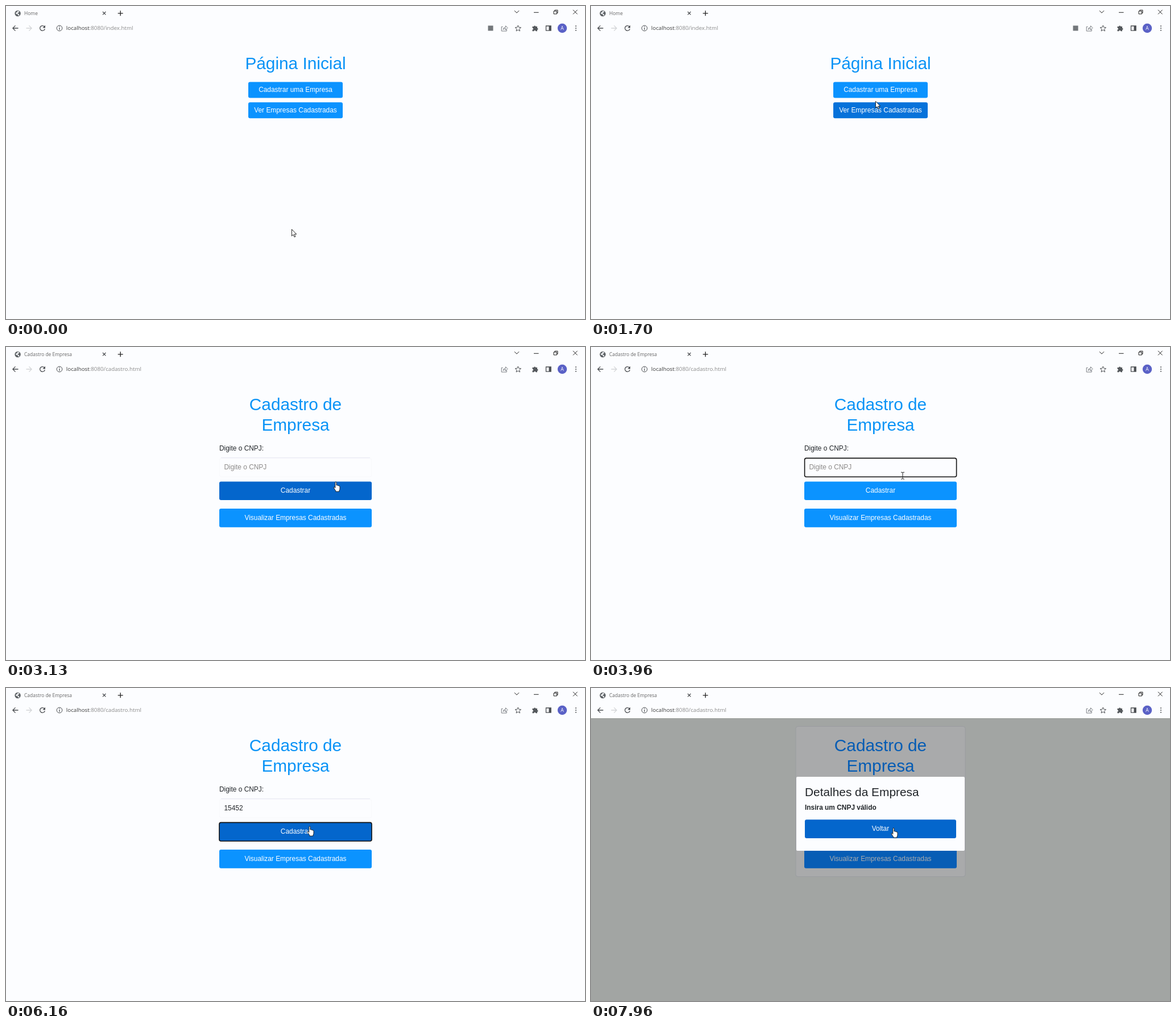
Animation of 1018x550 px, one loop 8000 ms. Source, as an HTML page:

```html
<!DOCTYPE html>
<html lang="pt">
<head>
<meta charset="utf-8">
<title>Cadastro</title>
<style>
html, body { margin: 0; width: 100%; height: 100%; overflow: hidden; background: #fcfdff; }
svg { display: block; width: 1018px; height: 550px; }
text { font: 11.92px "Liberation Sans", Arial, sans-serif; fill: #212529; }
.h1 { font-size: 29.8px; fill: #0a93f6; text-anchor: middle; }
.h2 { font-size: 20.86px; }
.bold { font-weight: 700; }
.btn { fill: #fff; text-anchor: middle; }
.hint { fill: #8c8a88; }
.tab { font: 8.45px "Open Sans", "Noto Sans", sans-serif; fill: #666; }
.url { font: 9.76px "Open Sans", "Noto Sans", sans-serif; fill: #8b8b8b; }
.host { fill: #3c3c3c; }
.line { fill: none; stroke: #4a4d51; stroke-width: 1.3; }
.thin { fill: none; stroke: #222; stroke-width: 1; }
.pointer { fill: #fff; stroke: #111; stroke-width: .9; stroke-linejoin: round; }
</style>
</head>
<body>
<svg viewBox="0 0 1018 550">
  <rect width="1018" height="550" fill="#fcfdff"/>

  <g id="homePage">
    <text class="h1" x="509" y="111">Página Inicial</text>
    <rect id="focusRing" x="424.5" y="132" width="169" height="31" rx="4" fill="#a9defb"/>
    <rect id="register" x="426" y="133.5" width="166" height="28" rx="3"/>
    <text class="btn" x="509" y="151">Cadastrar uma Empresa</text>
    <rect id="list" x="426" y="169.3" width="166" height="28" rx="3"/>
    <text class="btn" x="509" y="187">Ver Empresas Cadastradas</text>
  </g>

  <g id="formPage">
    <g id="dim">
      <rect y="53" width="1018" height="497" fill="#a2a5a3"/>
      <rect x="360" y="67.5" width="298" height="264" rx="4" fill="#a9aaab" stroke="#9a9ca0"/>
    </g>
    <text class="h1 tinted" x="509" y="111">Cadastro de</text>
    <text class="h1 tinted" x="509" y="147">Empresa</text>
    <text x="375" y="182">Digite o CNPJ:</text>
    <rect id="field" x="375.6" y="195.4" width="267" height="32.8" rx="3" fill="#fcfdff"/>
    <path id="fieldTop" d="M378 194.7H640" stroke="#e6e8f1"/>
    <text id="entry" x="383.5" y="215.3"></text>
    <rect id="caret" y="205" width="1" height="13" fill="#111"/>
    <rect id="submit" x="375" y="236.4" width="268" height="32.6" rx="3"/>
    <text class="btn" x="509" y="256.3">Cadastrar</text>
    <rect id="view" x="375" y="284" width="268" height="32.8" rx="3"/>
    <text id="viewLabel" class="btn" x="509" y="304">Visualizar Empresas Cadastradas</text>
    <g id="modal">
      <rect x="361" y="156" width="296" height="130" rx="2" fill="#fcfdff"/>
      <text class="h2" x="376" y="190">Detalhes da Empresa</text>
      <text class="bold" x="376" y="213.8">Insira um CNPJ válido</text>
      <rect id="back" x="376" y="231.3" width="266" height="32.6" rx="3"/>
      <text class="btn" x="509" y="251">Voltar</text>
    </g>
  </g>

  <g id="browser">
    <g id="globe">
      <circle cx="20.6" cy="13" r="5.2" fill="#5c6064"/>
      <path d="M17 11.5q2 .2 2.6-1.5t2.3-1.2l1.6 1.2-1.5 1.6-2 1.3 2.6 1 1 2-1.6 1.3-1.6-2.6-2.7-.5z" fill="#eef0f2"/>
    </g>
    <path id="spinner" d="M15.6 11.6A5.2 5.2 0 1 0 25.8 11.6" fill="none" stroke="#4a90df" stroke-width="1.3"/>
    <text id="tabTitle" class="tab" x="32" y="16"></text>
    <path class="line" d="M170 10l5.4 5.4m0-5.4l-5.4 5.4"/>
    <path class="line" style="stroke:#222" d="M196.7 12.8h9m-4.5-4.5v9"/>
    <path class="thin" d="M894 8.2l4 4 4-4M928 11.3h8.5M963 9h5.4v5h-5.4zM964.8 9V7.2h5.2v5h-1.6M997 6.8l7.6 7.6m0-7.6l-7.6 7.6"/>
    <path class="line" d="M21.5 39h-9.6m4.6-4.6L11.900 39l4.600 4.600"/>
    <path class="line" style="stroke:#d3d5d8" d="M35.500 39h9.600m-4.600-4.600L45.100 39l-4.600 4.600"/>
    <g id="reload">
      <path class="line" d="M67.400 36.100A4.400 4.400 0 1 0 68.300 40.200"/>
      <path d="M69 33.800v4.600h-4.600z" fill="#4a4d51"/>
    </g>
    <path id="stop" class="line" d="M60 35l8 8m0-8l-8 8"/>
    <circle class="line" style="stroke-width:1" cx="94" cy="39" r="4.800"/>
    <path class="line" d="M94 38.300v3.400M94 35.800v1.300"/>
    <text class="url" x="105.800" y="42.300"><tspan class="host">localhost</tspan><tspan id="path"></tspan></text>

    <rect id="translate" x="847.500" y="34.500" width="9" height="9" fill="#73777b"/>
    <path class="thin" style="stroke:#777b80" d="M873.500 36.500h-2.300v7.500h9v-2.800M874 41.300q.3-3.800 4.500-4v-2.500l3.500 3.700-3.500 3.600v-2.400q-3-.1-4.500 1.600z"/>
    <path class="thin" style="stroke:#4a4d51" d="M900.300 34l1.500 3.500 3.700.3-2.800 2.500.8 3.700-3.200-2-3.200 2 .8-3.700-2.800-2.500 3.700-.3z"/>
    <path fill="#55595d" d="M925.500 36h2.700a1.500 1.500 0 0 1 3 0h2.800v2.800a1.500 1.500 0 0 1 0 3v2.400h-2.700a1.500 1.500 0 0 0-3 0h-2.800v-2.700a1.500 1.500 0 0 0 0-3z"/>
    <path class="line" d="M949.500 35h8.600v8.200h-8.600z"/>
    <path fill="#4a4d51" d="M954.500 35h3.600v8h-3.600z"/>
    <circle cx="978" cy="39" r="8.200" fill="#5a61c6"/>
    <text class="tab" style="fill:#fff" x="978" y="42" text-anchor="middle">A</text>
    <g fill="#4a4d51"><circle cx="1002" cy="35.300" r="1"/><circle cx="1002" cy="39" r="1"/><circle cx="1002" cy="42.700" r="1"/></g>
  </g>

  <g id="mouse">
    <path id="arrow" class="pointer" d="M.4.400V12.200l2.700-2.500 1.900 4.300 1.900-.8-1.900-4.200h3.700z"/>
    <path id="hand" class="pointer" d="M-1.200 10.500V1.200q0-1.200 1.100-1.200T1 1.200V6q1.500-1 2.100.5 1.500-.7 2 .6 1.900-.4 1.900 1.300v3.700q0 1.800-1.100 3.200v1.700h-6.200v-1.400q-2-2.300-3.400-5.400-.2-1.500 1.100-1.200z"/>
    <path id="beam" class="thin" d="M-3-5.800h2.200L0-5 .800-5.800H3M0-5V5.200M-3 6h2.200L0 5.200.800 6H3"/>
  </g>
</svg>
<script>
const LOOP = 8000;
const LOAD = 2230, FORM = 2600, FOCUS = 3430, CLICK = 6060, MODAL = 6900;
const BASE = [11, 147, 255], HOVER = [4, 102, 204], DIMMED = [7, 93, 181];
const KEY_TIMES = [4330, 4500, 4660, 4800, 5000];
const DIGIT_WIDTH = 6.63;

// Pointer stops: time, x, y
const STOPS = [
  [200, 502, 392], [1200, 503, 190], [1560, 500, 184], [1700, 500, 167],
  [1850, 504, 150], [2360, 504, 150], [2530, 634, 282], [2700, 634, 282],
  [3130, 580, 237], [3450, 548, 226], [5730, 548, 226], [6100, 534, 243],
  [7595, 534, 243], [7630, 532, 246]
];
const HAND_TIMES = [[1160, 1665], [1760, 2390], [2850, 3150], [5937, LOOP]];

const ui = {};
document.querySelectorAll('[id]').forEach(el => ui[el.id] = el);
const tinted = document.querySelectorAll('.tinted');

const clamp = v => Math.max(0, Math.min(1, v));
const smooth = v => v * v * (3 - 2 * v);
const within = (t, from, to) => t >= from && t < to;
const show = (el, on) => el.style.display = on ? '' : 'none';
const setText = (el, text) => { if (el.textContent !== text) el.textContent = text; };
const paint = (el, rgb) => el.setAttribute('fill', `rgb(${rgb.map(Math.round)})`);

// Hover level with a 150 ms transition in and out
const hover = (t, from, to) => smooth(clamp((t - from) / 150)) * (1 - smooth(clamp((t - to) / 150)));
const shade = (el, level) => paint(el, BASE.map((c, i) => c + (HOVER[i] - c) * level));

function pointerAt(t) {
  const next = STOPS.findIndex(s => s[0] > t);
  if (next === 0) return STOPS[0].slice(1);
  if (next < 0) return STOPS[STOPS.length - 1].slice(1);
  const [t0, x0, y0] = STOPS[next - 1], [t1, x1, y1] = STOPS[next];
  const k = smooth((t - t0) / (t1 - t0));
  return [x0 + (x1 - x0) * k, y0 + (y1 - y0) * k];
}

function drawBrowser(t) {
  const loading = within(t, LOAD, FORM), left = t >= LOAD;
  show(ui.globe, !loading);
  show(ui.spinner, loading);
  show(ui.reload, !loading);
  show(ui.stop, loading);
  show(ui.translate, !left);
  ui.spinner.setAttribute('transform', `rotate(${(t - 2530) * 0.4} 20.700 13)`);
  setText(ui.tabTitle, left ? 'Cadastro de Empresa' : 'Home');
  setText(ui.path, left ? ':8080/cadastro.html' : ':8080/index.html');
}

function drawHome(t) {
  show(ui.homePage, t < FORM);
  show(ui.focusRing, t >= 2150);
  shade(ui.register, hover(t, 1760, 2460));
  shade(ui.list, hover(t, 1160, 1650));
}

function drawForm(t) {
  const modal = t >= MODAL, focused = within(t, FOCUS, CLICK);
  show(ui.formPage, t >= FORM);
  show(ui.dim, modal);
  show(ui.modal, modal);
  tinted.forEach(el => el.style.fill = modal ? '#055cb4' : '');

  const typed = KEY_TIMES.filter(k => k <= t).length;
  setText(ui.entry, typed ? '15452'.slice(0, typed) : 'Digite o CNPJ');
  ui.entry.setAttribute('class', typed ? '' : 'hint');
  const lastKey = typed ? KEY_TIMES[typed - 1] : FOCUS;
  show(ui.caret, focused && (t - lastKey) % 1000 < 500);
  ui.caret.setAttribute('x', 383 + typed * DIGIT_WIDTH);

  ui.field.setAttribute('stroke', focused ? '#111' : '#f6f6fa');
  ui.field.setAttribute('stroke-width', focused ? 1.6 : 0.8);
  show(ui.fieldTop, !focused);

  shade(ui.submit, Math.max(hover(t, 2850, 3140), hover(t, 5937, LOOP)));
  ui.submit.setAttribute('stroke', t >= CLICK ? '#111' : 'none');
  ui.submit.setAttribute('stroke-width', 1.6);
  paint(ui.view, modal ? DIMMED : BASE);
  ui.viewLabel.style.fill = modal ? '#a9abad' : '';
  shade(ui.back, hover(t, MODAL + 10, LOOP));
}

function drawMouse(t) {
  const hand = HAND_TIMES.some(([from, to]) => within(t, from, to));
  const beam = within(t, 3350, 5808);
  show(ui.hand, hand);
  show(ui.beam, beam);
  show(ui.arrow, !hand && !beam);
  const [x, y] = pointerAt(t).map(Math.round);
  ui.mouse.setAttribute('transform', `translate(${x} ${y})`);
}

function draw(t) {
  drawBrowser(t);
  drawHome(t);
  drawForm(t);
  drawMouse(t);
}

const start = performance.now();
function tick() {
  draw((performance.now() - start) % LOOP);
  requestAnimationFrame(tick);
}
tick();
</script>
</body>
</html>
```
